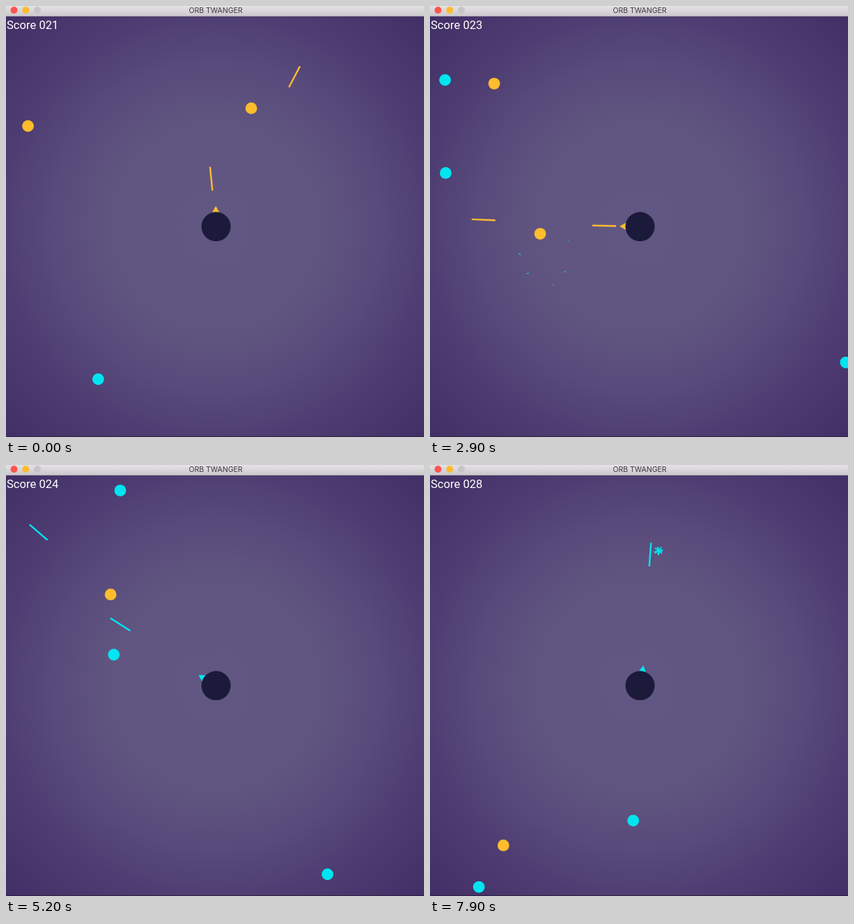
These frames come from a looping animation (600x618 px, 8000 ms). An HTML page with a canvas:

```html
<!DOCTYPE html>
<html lang="en">
<head>
<meta charset="utf-8">
<title>ORB TWANGER</title>
<style>
  html, body { margin: 0; width: 100%; height: 100%; overflow: hidden; background: #43316a; }
  canvas { display: block; }
</style>
</head>
<body>
<canvas id="stage" width="600" height="618"></canvas>
<script>
const ctx = document.getElementById('stage').getContext('2d');
const W = 600, H = 618, BAR = 15, CX = 301.5, CY = 316.3;
const LOOP = 8, STEP = 0.1; // seconds
const GOLD = '#ffbc2d', CYAN = '#00e5f0';
const RELOAD = 0.2661, FIRST_SHOT = -0.372, SPEED = 652;

// Turns of the ship: [seconds, degrees]
const AIM = [
  [-0.37, -62.6], [-0.1, -96.5], [0.43, -66], [1.23, -114.3], [1.5, -189.3],
  [2.03, -205], [2.55, -177.5], [2.9, -179], [3.36, -190], [3.9, -131.6],
  [4.45, -132], [5, -149], [5.49, -149], [5.75, -120.3], [5.91, -120],
  [6.02, -129], [6.82, -131.7], [7, -120], [7.61, -85.6], [7.9, -80.5]
];
const SWITCHES = [0.9, 2.27, 4.3, 5.95, 7.2]; // ammo changes colour
const BOUNCE = 4.12; // two dots meet and trade places

// Each dot spirals in: at time `at` it is r from the ship at angle deg,
// falling with speed v (growing by pull) and turning by spin (growing by bend).
const DOTS = [
  { color: GOLD, at: 0, dead: 0.64, r: 177, v: 60, deg: -73.4, spin: 11 },
  { color: CYAN, at: 0, dead: 2.26, r: 276.6, v: 47, deg: 127.7, spin: 11.65 },
  { color: GOLD, at: 0, dead: 3.51, r: 306, v: 40, deg: 208.1, spin: -11.1 },
  { color: GOLD, at: 1.6, dead: 5.21, r: 332.7, v: 19.6, pull: 8.4, deg: 240, spin: -12, swaps: true },
  { color: CYAN, at: 2.9, dead: 6.24, r: 289.4, v: 19.6, pull: 8.4, deg: 195.4, spin: 13.2, bend: -0.94, swaps: true },
  { color: GOLD, at: 5.9, dead: 6.7, r: 304, v: 36, deg: 239.7, spin: -11.5 },
  { color: CYAN, at: 2.9, dead: 7.86, r: 350, v: 4, deg: 216.9, spin: 11.2, bend: 0.22 },
  { color: CYAN, at: 2.9, dead: 9, r: 353.8, v: 4.5, deg: 33.4, spin: 10.8, bend: 0.22 },
  { color: GOLD, at: 7, dead: 9, r: 334, v: 31, deg: 141, spin: -11.6 },
  { color: CYAN, at: 7.9, dead: 9, r: 370, v: 10, deg: 128.7, spin: 11 }
];
const LEAD = 0.6; // a dot exists this long before its `at`

const rad = deg => deg * Math.PI / 180;
const polar = (r, a) => [CX + r * Math.cos(a), CY + r * Math.sin(a)];
const colorAt = t => SWITCHES.filter(s => s <= t).length % 2 ? CYAN : GOLD;

function aimAt(t) {
  const i = Math.max(1, AIM.findIndex(key => key[0] >= t));
  const [t0, a0] = AIM[i - 1], [t1, a1] = AIM[i];
  return rad(a0 + (a1 - a0) * (t - t0) / (t1 - t0));
}

function placeOf({ at, r, v, pull = 5.5, deg, spin, bend = 0 }, t) {
  const s = t - at;
  return polar(r - v * s - pull * s * s, rad(deg + spin * s + bend * s * s));
}

function colorOf(dot, t) {
  if (!dot.swaps || t < BOUNCE) return dot.color;
  return dot.color === GOLD ? CYAN : GOLD;
}

function random(seed) {
  const n = Math.sin(seed * 127.1 + 11.7) * 43758.5453;
  return n - Math.floor(n);
}

function disc(x, y, r, color) {
  ctx.fillStyle = color;
  ctx.beginPath();
  ctx.arc(x, y, r, 0, 7);
  ctx.fill();
}

function line([x, y], angle, half, width, color) {
  const dx = Math.cos(angle) * half, dy = Math.sin(angle) * half;
  ctx.strokeStyle = color;
  ctx.lineWidth = width;
  ctx.beginPath();
  ctx.moveTo(x - dx, y - dy);
  ctx.lineTo(x + dx, y + dy);
  ctx.stroke();
}

const glow = ctx.createRadialGradient(CX, CY, 0, CX, CY, 430);
[[0, '#615783'], [0.35, '#605580'], [0.55, '#584a7b'], [0.72, '#4e3d72'], [1, '#412e65']]
  .forEach(([at, c]) => glow.addColorStop(at, c));

function drawBackground() {
  ctx.fillStyle = glow;
  ctx.fillRect(0, 0, W, H);
  ctx.fillStyle = '#2b2142';
  ctx.fillRect(0, H - 1, W, 1);
}

function drawShots(t) {
  for (let fired = FIRST_SHOT; fired < t; fired += RELOAD) {
    const d = (t - fired) * SPEED, a = aimAt(fired);
    if (d > 34) line(polar(d, a), a, 17, 2.4, colorAt(fired));
  }
}

function drawBurst(dot, index, t) {
  const age = t - dot.dead, color = colorOf(dot, dot.dead);
  const [x, y] = placeOf(dot, dot.dead);
  for (let i = 0; i < 11; i++) {
    const seed = index * 31 + i;
    const a = (i + random(seed) * 0.7) * Math.PI * 2 / 11;
    const d = age * (30 + 55 * random(seed + 0.5));
    const left = 1 - age / (0.35 + 0.6 * random(seed + 0.25));
    if (left <= 0) continue;
    const spot = [x + d * Math.cos(a), y + d * Math.sin(a)];
    line(spot, a, 0.8 + 3.4 * left, 0.8 + 0.9 * left, color);
  }
}

function drawDots(t) {
  DOTS.forEach((dot, i) => {
    if (t < dot.at - LEAD) return;
    if (t < dot.dead) disc(...placeOf(dot, t), 8.4, colorOf(dot, t));
    else drawBurst(dot, i, t);
  });
}

function drawShip(t) {
  ctx.save();
  ctx.translate(CX, CY);
  ctx.rotate(aimAt(t));
  ctx.fillStyle = colorAt(t);
  ctx.beginPath();
  ctx.moveTo(29.5, 0);
  ctx.lineTo(20, 5.2);
  ctx.lineTo(20, -5.2);
  ctx.fill();
  ctx.restore();
  disc(CX, CY, 21, '#1b1a3b');
}

function drawBar() {
  const g = ctx.createLinearGradient(0, 0, 0, BAR);
  g.addColorStop(0, '#e4e2e4');
  g.addColorStop(1, '#cac8cb');
  ctx.fillStyle = g;
  ctx.fillRect(0, 0, W, BAR);
  ctx.fillStyle = '#aaa7b0';
  ctx.fillRect(0, BAR - 1, W, 1);
  ['#fc5550', '#fdbb30', '#c6c4c7'].forEach((c, i) => disc(11.5 + 16.8 * i, 6, 5, c));
  ctx.fillStyle = '#38363a';
  ctx.font = '10.5px Inter, Roboto, sans-serif';
  ctx.textAlign = 'center';
  ctx.fillText('ORB TWANGER', 301, 10);
}

function drawScore(t) {
  const score = 21 + DOTS.filter(d => d.dead <= t).length;
  ctx.fillStyle = '#fff';
  ctx.font = '16.6px Roboto, "Liberation Sans", sans-serif';
  ctx.textAlign = 'left';
  ctx.fillText('Score 0' + score, 1, 32.8);
}

const start = performance.now();

function frame() {
  const elapsed = (performance.now() - start) / 1000 % LOOP;
  const t = Math.floor(elapsed / STEP + 1e-6) * STEP;
  drawBackground();
  drawShots(t);
  drawDots(t);
  drawShip(t);
  drawScore(t);
  drawBar();
  requestAnimationFrame(frame);
}
frame();
</script>
</body>
</html>
```
